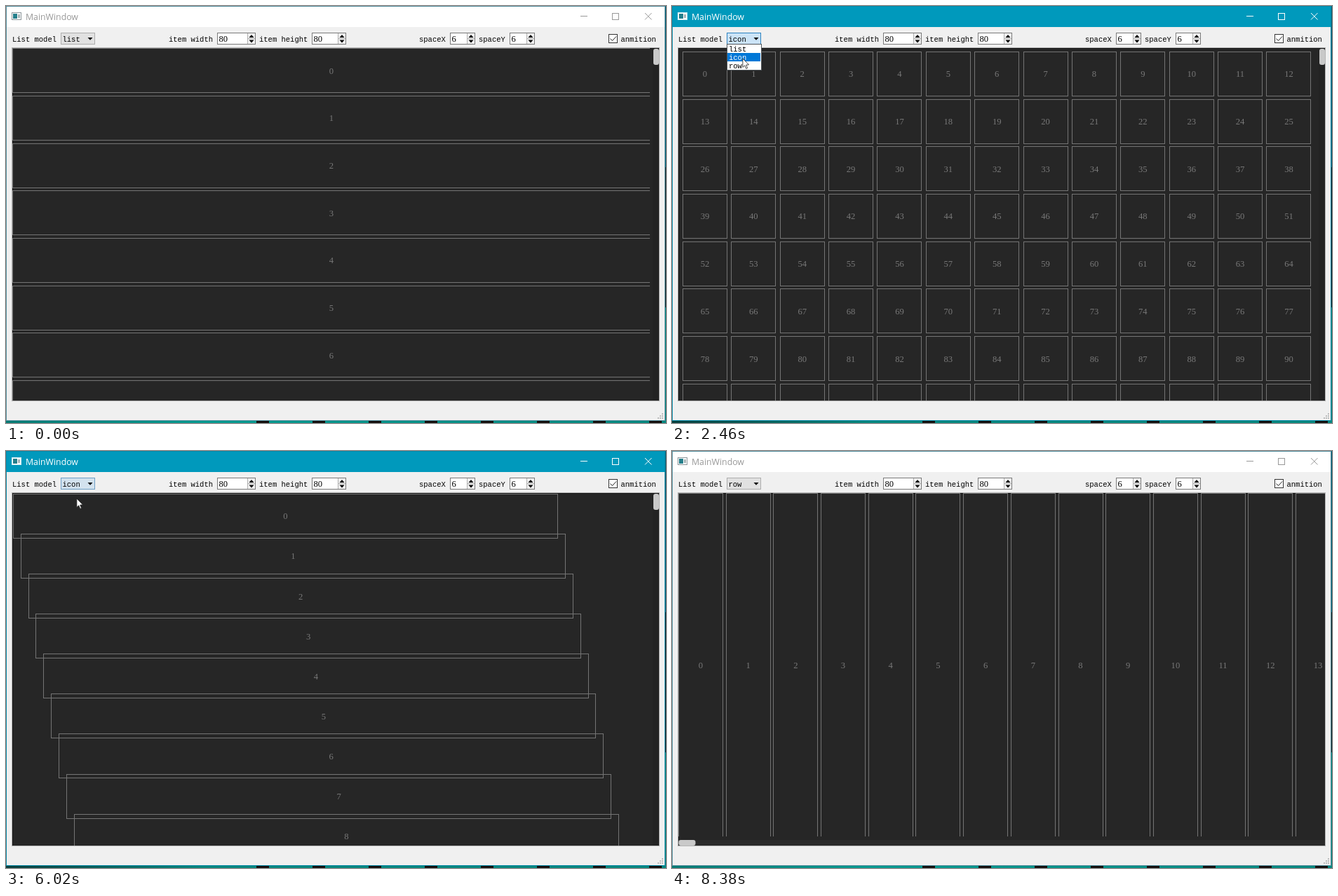
An HTML page with a canvas for the animation above (8.46 s loop, 941x595 px).

```html
<!DOCTYPE html>
<html lang="en">
<head>
<meta charset="utf-8">
<title>MainWindow</title>
<style>
html, body { margin: 0; width: 100%; height: 100%; overflow: hidden; background: #f0f0f0; }
canvas { display: block; width: 941px; height: 595px; }
</style>
</head>
<body>
<canvas id="stage" width="941" height="595"></canvas>
<script>
const ctx = document.getElementById('stage').getContext('2d');
const LOOP = 8460, REFRESH = 80, MOVE_TIME = 300, HOLD = 150;
const ACTIVATED = 70, POINTER_GONE = 8140, DEACTIVATED = 8380;
const ITEM = 63, PITCH = 67.7, COLUMNS = 13, ITEM_COUNT = 117;
const MODES = ['list', 'icon', 'row'];
const MONO = '10.5px "Liberation Mono", monospace';
const DIGITS = '12.6px "Liberation Serif", serif';
const TITLE = '12.3px "Open Sans", sans-serif';

// Each use of the combo box: pressed at, popup closed at, delay until the items move.
const CHOICES = [
  { mode: 'icon', press: 960, close: 1430, lag: 48, pressY: 50 },
  { mode: 'row', press: 2080, close: 3010, lag: 33, pressY: 50 },
  { mode: 'list', press: 3890, close: 4680, lag: 33, pressY: 37 },
  { mode: 'icon', press: 5540, close: 5940, lag: 33, pressY: 47 },
  { mode: 'row', press: 6410, close: 7260, lag: 33, pressY: 50 }
].map(c => ({ ...c, open: c.press + REFRESH, pick: c.close - HOLD, move: c.close + c.lag }));

const linear = p => p;
const easeOut = p => 1 - (1 - p) ** 3;
const mix = (a, b, p) => a + (b - a) * p;

// The pointer enters at the lower right, visits combo box and popup entries, and leaves again.
const PATH = [
  { at: ACTIVATED, x: 917, y: 590 },
  ...CHOICES.flatMap(c => {
    const combo = { x: 102, y: c.pressY };
    const entry = { x: 100, y: 62 + 9 * MODES.indexOf(c.mode) };
    return [
      { at: c.press, ...combo }, { at: c.open, ...combo },
      { at: c.pick, ...entry, ease: easeOut }, { at: c.close, ...entry }
    ];
  }),
  { at: 8060, x: 917, y: 587 }
];

function pointerAt(t) {
  const next = PATH.findIndex(key => key.at > t);
  if (next <= 0) return PATH.at(next);
  const a = PATH[next - 1], b = PATH[next];
  const p = (b.ease || linear)((t - a.at) / (b.at - a.at));
  return { x: mix(a.x, b.x, p), y: mix(a.y, b.y, p) };
}

function fill(color, x, y, w, h) {
  ctx.fillStyle = color;
  ctx.fillRect(x, y, w, h);
}

function frame(color, x, y, w, h) {
  ctx.strokeStyle = color;
  ctx.lineWidth = 1;
  ctx.strokeRect(x + 0.5, y + 0.5, w - 1, h - 1);
}

function trace(points) {
  ctx.beginPath();
  for (let i = 0; i < points.length; i += 2) ctx.lineTo(points[i], points[i + 1]);
}

function line(color, ...points) {
  trace(points);
  ctx.strokeStyle = color;
  ctx.lineWidth = 1;
  ctx.stroke();
}

function polygon(color, ...points) {
  trace(points);
  ctx.closePath();
  ctx.fillStyle = color;
  ctx.fill();
}

function text(value, x, y, color = '#000', font = MONO, align = 'left') {
  ctx.font = font;
  ctx.fillStyle = color;
  ctx.textAlign = align;
  ctx.fillText(value, x, y);
}

function drawDesktop(active) {
  const teal = ctx.createLinearGradient(0, 0, 941, 0);
  teal.addColorStop(0, active ? '#0a3f3d' : '#087a73');
  teal.addColorStop(0.3, active ? '#07877e' : '#079a90');
  teal.addColorStop(1, '#06877e');
  fill(teal, 0, 0, 941, 595);
  ctx.strokeStyle = '#15100e';
  ctx.lineWidth = 4;
  ctx.setLineDash([18, 62]);
  ctx.beginPath();
  ctx.moveTo(357, 593);
  ctx.lineTo(941, 593);
  ctx.stroke();
  ctx.setLineDash([]);
  fill('#075d73', 939, 0, 2, 230);
  fill('#111f22', 940, 230, 1, 200);
}

function drawWindow(active) {
  const ink = active ? '#fff' : '#999';
  fill('#f0f0f0', 0, 0, 940, 591);
  fill(active ? '#0099bc' : '#fff', 0, 0, 940, 30);
  frame(active ? '#0587a5' : '#528d9c', 0, 0, 940, 592);

  fill('#fff', 8, 9, 14, 11);
  frame(active ? '#d8eef3' : '#8c969a', 8, 9, 14, 11);
  fill('#257f8b', 10, 11, 6, 7);
  fill('#a9b6b8', 17, 12, 3, 5);
  text('MainWindow', 28, 20, ink, TITLE);

  line(ink, 819, 14.5, 829, 14.5);
  frame(ink, 864, 10, 10, 10);
  line(ink, 911, 10, 920.5, 19.5);
  line(ink, 911, 19.5, 920.5, 10);

  for (let row = 0; row < 3; row++) {
    for (let col = 0; col <= row; col++) fill('#bcbcbc', 935 - col * 3, 581 + row * 3, 2, 2);
  }
}

function drawSpin(label, labelX, value, x, w) {
  const left = x + w - 12, mid = left + 6;
  text(label, labelX, 51);
  fill('#fff', x, 38, w, 17);
  frame('#7a7a7a', x, 38, w, 17);
  fill('#f0f0f0', left, 39, 11, 15);
  line('#b0b0b0', left + 0.5, 39, left + 0.5, 54);
  line('#b0b0b0', left, 46.5, left + 11, 46.5);
  polygon('#000', mid - 3.5, 45, mid, 41, mid + 3.5, 45);
  polygon('#000', mid - 3.5, 48.5, mid, 52.5, mid + 3.5, 48.5);
  text(value, x + 2.5, 51, '#000', DIGITS);
}

function drawToolbar(mode, look) {
  const [face, edge] = {
    normal: ['#e1e1e1', '#adadad'], hover: ['#d3e2ee', '#6f9fc6'], open: ['#cce4f7', '#2d83c1']
  }[look];
  text('List model', 9, 51);
  fill(face, 78, 38, 49, 17);
  frame(edge, 78, 38, 49, 17);
  text(mode, 80.5, 51);
  polygon('#000', 116.5, 45, 123.5, 45, 120, 48.8);

  drawSpin('item width', 232, '80', 301, 55);
  drawSpin('item height', 361, '80', 436, 49);
  drawSpin('spaceX', 589, '6', 633, 36);
  drawSpin('spaceY', 674, '6', 718, 36);

  fill('#fff', 859, 40, 13, 13);
  frame('#333', 859, 40, 13, 13);
  line('#222', 861.5, 46.5, 864.5, 49.5, 870, 43.5);
  text('anmition', 876.5, 51);
}

// Item box as x, y, width, height. Without a scroll bar the long side is 13px longer.
function itemBox(mode, i, barHidden) {
  const extra = barHidden ? 13 : 0;
  if (mode === 'list') return [9.4, 60.7 + PITCH * i, 908.8 + extra, ITEM];
  if (mode === 'row') return [9.4 + PITCH * i, 60.7, ITEM, 490 + extra];
  return [15.5 + 69.37 * (i % COLUMNS), 65.4 + PITCH * Math.floor(i / COLUMNS), ITEM, ITEM];
}

function drawItems(from, to, p) {
  const across = to === 'row';
  const barHidden = p < 1 && (across || from === 'row');
  frame('rgba(0, 0, 0, 0.25)', 8, 59, 924, 505);
  fill('#262626', 9, 60, 922, 503);
  line('#161616', 9.5, 563, 9.5, 60.5, 931, 60.5);

  ctx.save();
  ctx.beginPath();
  ctx.rect(9, 60, across || barHidden ? 922 : 909, across && !barHidden ? 490 : 503);
  ctx.clip();
  for (let i = 0; i < ITEM_COUNT; i++) {
    const start = itemBox(from, i, false), end = itemBox(to, i, barHidden);
    const [x, y, w, h] = start.map((v, k) => mix(v, end[k], p));
    const left = Math.floor(x), top = Math.floor(y);
    frame('#747474', left, top, Math.floor(x + w) - left + 1, Math.floor(y + h) - top + 1);
    text(i, x + w / 2, y + h / 2 + 4.4, '#787878', DIGITS, 'center');
  }
  ctx.restore();

  if (barHidden) return;
  if (across) fill('#2b2b2b', 9, 555, 922, 8);
  else fill('#232323', 922, 61, 9, 502);
  ctx.fillStyle = '#c9c9c9';
  ctx.beginPath();
  if (across) ctx.roundRect(9.5, 555, 24, 8, 3);
  else ctx.roundRect(923, 61, 8, 23, 3);
  ctx.fill();
}

function drawPopup(selected) {
  fill('#fff', 78, 55, 49, 36);
  MODES.forEach((name, i) => {
    if (i === selected) fill('#0078d7', 79, 55 + i * 12, 47, 12);
    text(name, 81, 65 + i * 12, i === selected ? '#fff' : '#000');
  });
  frame('#50565a', 78, 54, 50, 38);
}

function drawPointer(x, y, clicking) {
  if (clicking) {
    ctx.fillStyle = 'rgba(226, 214, 36, 0.72)';
    ctx.beginPath();
    ctx.arc(x, y, 12, 0, Math.PI * 2);
    ctx.fill();
  }
  ctx.save();
  ctx.translate(x, y);
  polygon('#fff', 0.5, 0.5, 0.5, 13, 3.3, 10.4, 5.4, 15, 7.3, 14.1, 5.3, 9.7, 9.2, 9.4);
  ctx.strokeStyle = '#1c1c1c';
  ctx.lineWidth = 0.8;
  ctx.stroke();
  ctx.restore();
}

function draw(t) {
  const active = t >= ACTIVATED && t < DEACTIVATED;
  const { x, y } = pointerAt(t);
  const within = (a, b) => CHOICES.some(c => t >= c[a] && t < c[b]);

  const count = CHOICES.filter(c => t >= c.close).length;
  const choice = CHOICES[count - 1];
  const mode = choice ? choice.mode : 'list';
  const previous = count > 1 ? CHOICES[count - 2].mode : 'list';

  // Items move in refresh steps counted from the moment the popup closes.
  let p = 1;
  if (choice) {
    const shown = choice.close + Math.floor((t - choice.close) / REFRESH) * REFRESH;
    p = Math.max(0, Math.min(1, (shown - choice.move) / MOVE_TIME));
  }

  const isOpen = within('open', 'close');
  const overCombo = x > 78 && x < 127 && y > 42 && y < 55;
  const fading = choice && t - choice.close < 250;
  const look = isOpen ? 'open' : active && (overCombo || fading) ? 'hover' : 'normal';

  drawDesktop(active);
  drawWindow(active);
  drawToolbar(mode, look);
  drawItems(previous, mode, p);
  if (isOpen) drawPopup(y >= 55 ? Math.min(2, Math.floor((y - 55) / 12)) : MODES.indexOf(mode));
  if (t >= ACTIVATED && t < POINTER_GONE) {
    drawPointer(x, y, within('press', 'open') || within('pick', 'close'));
  }
}

const began = performance.now();
function tick() {
  draw((performance.now() - began) % LOOP);
  requestAnimationFrame(tick);
}
tick();
</script>
</body>
</html>
```
